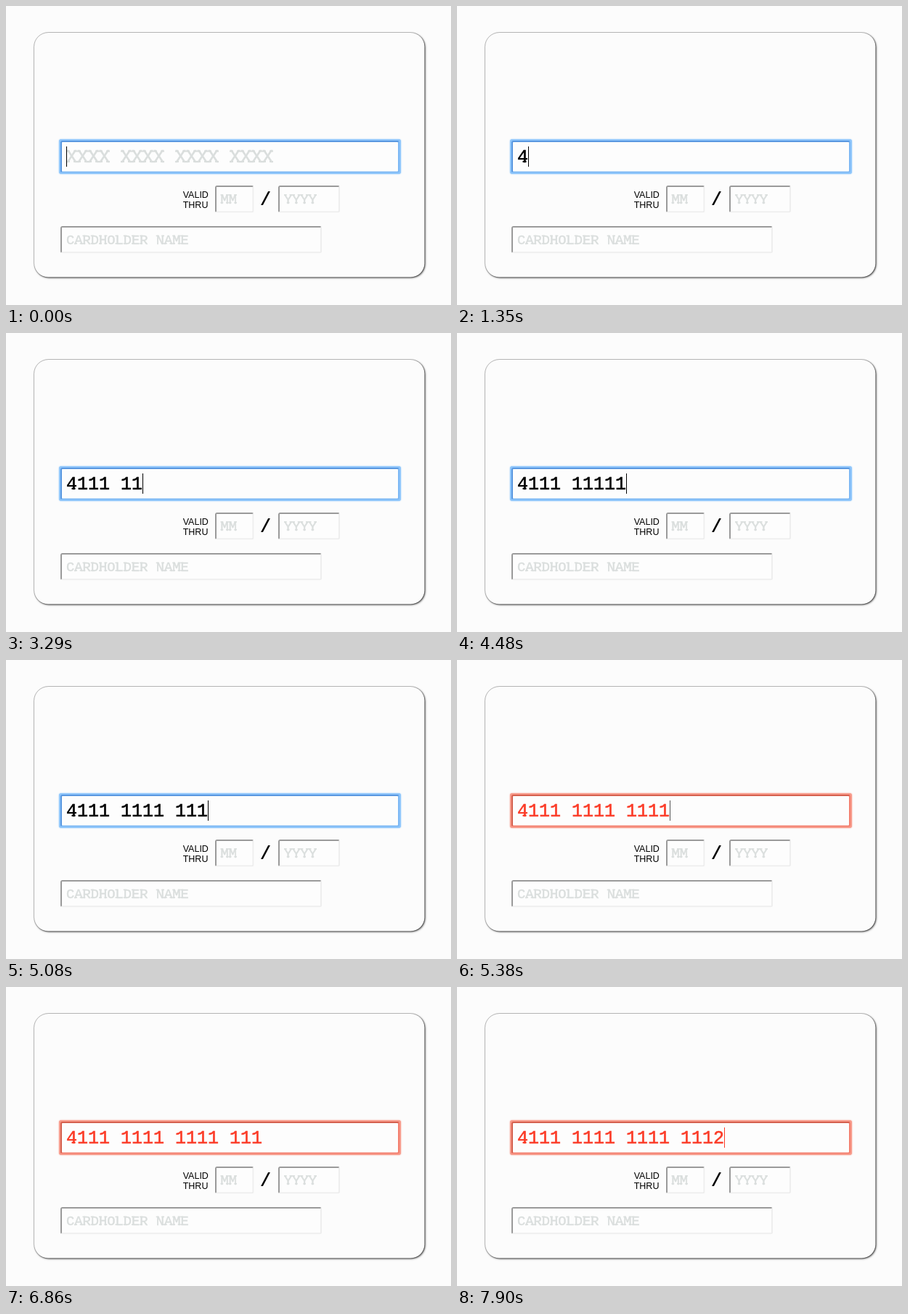
Write an HTML page with a canvas that moves like this. It is 613 px wide and 413 px high and loops after 8 s.

```html
<!DOCTYPE html>
<html lang="en">
<head>
<meta charset="utf-8">
<title>Card form</title>
<style>
html, body { margin: 0; width: 613px; height: 413px; overflow: hidden; background: #fcfcfc; }
canvas { display: block; }
</style>
</head>
<body>
<canvas id="stage" width="613" height="413"></canvas>
<script>
const ctx = document.getElementById('stage').getContext('2d');
const LOOP = 8000;
const PAPER = '#fcfcfc';
const HINT = '#dadedd';
const DIGITS = '4111111111111112';
const KEY_TIMES = [1350, 1800, 2100, 2400, 2990, 3290, 3590, 4030,
  4480, 4780, 5080, 5380, 5670, 5970, 6410, 7010];
const CARET_OFF = [[300, 900], [6860, 7010], [7450, 7900]];
const REFORMAT_DELAY = 150;
const SIZE = 25, SMALL = 18.75, PITCH = 15;

const NORMAL = { text: '#000', glow: '#8fc6fb', edge: '#5a98e0', low: '#7db8f4' };
const INVALID = { text: '#fb3b27', glow: '#f79a8a', edge: '#d5614f', low: '#f4806f' };

// Slab serifs: position across the em, and whether at the cap line or baseline.
const SLAB_AT = { l: [.1, 1], r: [.5, 1], L: [.1, 0], R: [.5, 0], C: [.3, 0], F: [.4, 0] };
const SLABS = { X: 'lrLR', M: 'lrLR', H: 'lrLR', N: 'lrR', Y: 'lrC', A: 'LR',
  R: 'lL', D: 'lL', E: 'lL', L: 'lL', 4: 'F' };

function roundRect(x, y, w, h, r) {
  ctx.beginPath();
  ctx.roundRect(x, y, w, h, r);
}

function fillRound(x, y, w, h, r, color) {
  roundRect(x, y, w, h, r);
  ctx.fillStyle = color;
  ctx.fill();
}

function typewriter(text, x, y, size, color) {
  ctx.font = `${size}px "Liberation Mono", monospace`;
  ctx.fillStyle = ctx.strokeStyle = color;
  ctx.lineWidth = size * .024;
  ctx.fillText(text, x, y);
  ctx.strokeText(text, x, y);
  [...text].forEach((ch, i) => {
    for (const key of SLABS[ch] || '') {
      const [across, top] = SLAB_AT[key];
      const left = x + (i * .6 + across - .1) * size;
      ctx.fillRect(left, y - (top ? .66 : .085) * size, .2 * size, .085 * size);
    }
  });
}

function drawCard() {
  ctx.save();
  ctx.shadowColor = 'rgba(0,0,0,.75)';
  ctx.shadowBlur = 2.5;
  ctx.shadowOffsetX = ctx.shadowOffsetY = 1;
  fillRound(39, 37, 537.5, 337.5, 19, PAPER);
  ctx.restore();
  roundRect(38.5, 36.5, 538.5, 338.5, 20);
  ctx.strokeStyle = 'rgba(0,0,0,.22)';
  ctx.lineWidth = 1;
  ctx.stroke();
}

// Two-pixel inset border: one colour on the top and left, another on the rest.
function insetBox(x, y, w, h, dark, light) {
  ctx.save();
  roundRect(x, y, w, h, 3);
  ctx.clip();
  ctx.fillStyle = light;
  ctx.fillRect(x, y, w, h);
  ctx.fillStyle = dark;
  ctx.beginPath();
  ctx.moveTo(x, y);
  ctx.lineTo(x + w, y);
  ctx.lineTo(x + w - 2, y + 2);
  ctx.lineTo(x + 2, y + 2);
  ctx.lineTo(x + 2, y + h - 2);
  ctx.lineTo(x, y + h);
  ctx.fill();
  ctx.restore();
  fillRound(x + 2, y + 2, w - 4, h - 4, 1, '#fdfdfd');
}

function drawFocused(theme) {
  ctx.save();
  ctx.shadowColor = theme.glow;
  ctx.shadowBlur = 2;
  fillRound(73, 184, 471, 48, 3, theme.glow);
  ctx.restore();
  insetBox(75, 186, 467, 44.5, theme.edge, theme.low);
}

function drawField(x, y, w, hint, hintX, baseline) {
  insetBox(x, y, w, 37.5, '#9a9a9a', '#eee');
  typewriter(hint, hintX, baseline, SMALL, HINT);
}

function drawLabels() {
  ctx.fillStyle = '#000';
  ctx.font = '12.5px "Liberation Sans", Arial, sans-serif';
  ctx.fillText('VALID', 243.7, 265);
  ctx.fillText('THRU', 243.7, 279);
  ctx.font = 'bold 25px "Liberation Mono", monospace';
  ctx.fillText('/', 350, 275);
}

const group = digits => digits.replace(/(\d{4})(?=\d)/g, '$1 ');

function typedText(time, count) {
  const fresh = time - KEY_TIMES[count - 1] < REFORMAT_DELAY;
  if (fresh && count % 4 === 1) return group(DIGITS.slice(0, count - 1)) + DIGITS[count - 1];
  return group(DIGITS.slice(0, count));
}

function draw(time) {
  const count = KEY_TIMES.filter(key => key <= time).length;
  const theme = count < 12 ? NORMAL : INVALID;
  const text = typedText(time, count);

  ctx.fillStyle = PAPER;
  ctx.fillRect(0, 0, 613, 413);
  drawCard();
  drawFocused(theme);
  drawField(288, 248, 53.5, 'MM', 295.5, 272.5);
  drawField(375, 248, 85, 'YYYY', 383, 272.5);
  drawField(75, 304, 360, 'CARDHOLDER NAME', 83, 329);
  drawLabels();

  typewriter(text || 'XXXX XXXX XXXX XXXX', 83, 216, SIZE, text ? theme.text : HINT);
  if (!CARET_OFF.some(([from, to]) => time >= from && time < to)) {
    ctx.fillStyle = count === 12 ? '#555' : theme.text;
    ctx.fillRect(83 + text.length * PITCH, 194, 1, 28);
  }
}

const start = performance.now();
function tick() {
  draw((performance.now() - start) % LOOP);
  requestAnimationFrame(tick);
}
tick();
</script>
</body>
</html>
```
